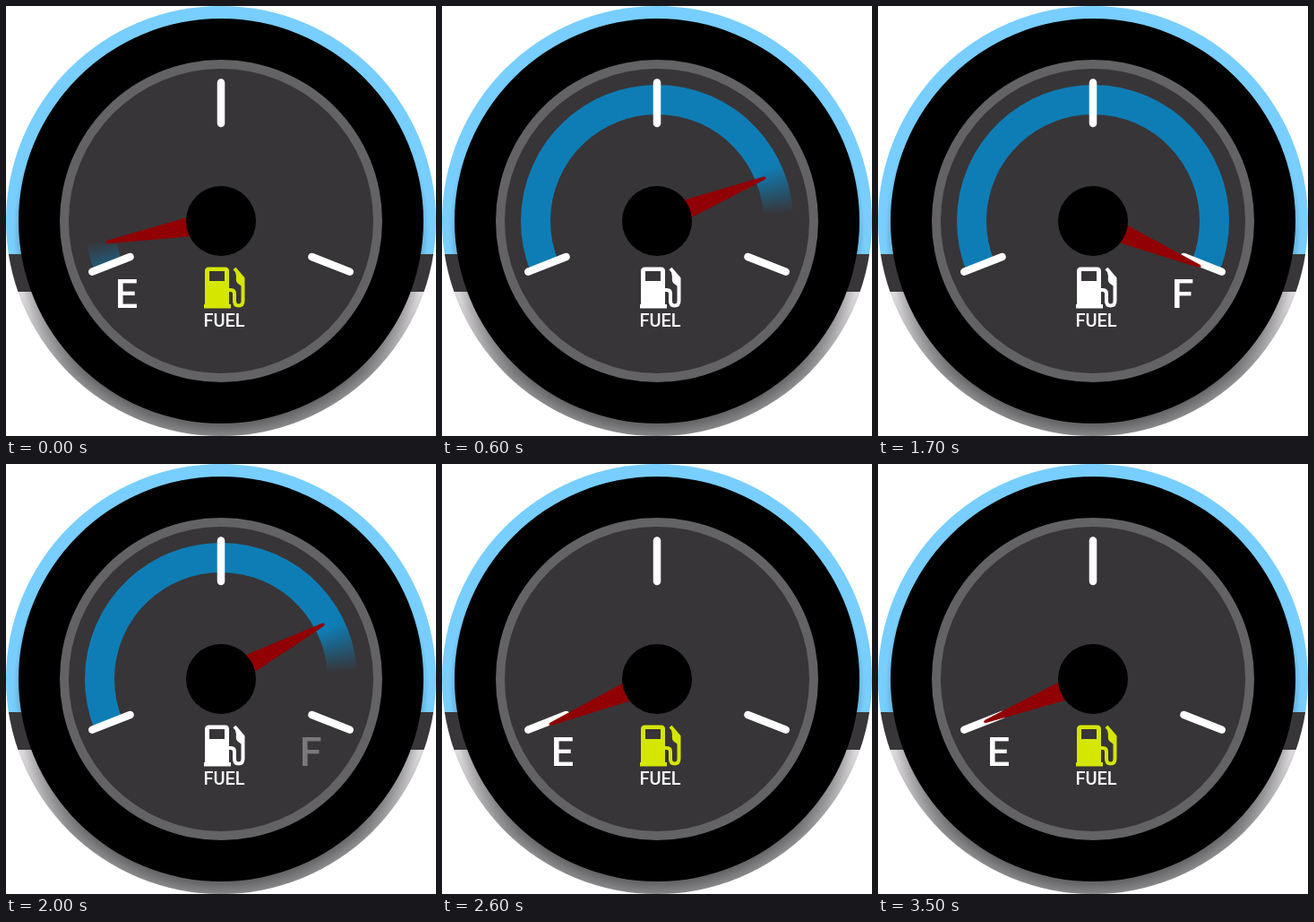
Write an HTML page with a canvas that moves like this. It is 480 px wide and 480 px high and loops after 3.6 s.

```html
<!DOCTYPE html>
<html>
<head>
<meta charset="utf-8">
<style>
html, body { margin: 0; width: 100%; height: 100%; overflow: hidden; background: #fff; }
canvas { display: block; }
</style>
</head>
<body>
<canvas id="stage" width="480" height="480"></canvas>
<script>
const ctx = document.getElementById('stage').getContext('2d');
const LOOP = 3600, C = 240, RAD = Math.PI / 180;
const FACE = '#373538', SWEEP = 113;

const ramp = (t, a, b) => Math.min(1, Math.max(0, (t - a) / (b - a)));
const ease = x => x * x * (3 - 2 * x);
const mix = (a, b, k) => a + (b - a) * k;

function disc(r, color) {
  ctx.fillStyle = color;
  ctx.beginPath();
  ctx.arc(C, C, r, 0, 7);
  ctx.fill();
}

function text(str, x, y, size, alpha = 1) {
  ctx.globalAlpha = alpha;
  ctx.fillStyle = '#fff';
  ctx.font = `500 ${size}px Roboto, sans-serif`;
  ctx.textAlign = 'center';
  ctx.fillText(str, x, y);
  ctx.globalAlpha = 1;
}

// Draw with the angle measured clockwise from twelve o'clock.
function rotated(angle, draw) {
  ctx.save();
  ctx.translate(C, C);
  ctx.rotate(angle * RAD);
  draw();
  ctx.restore();
}

function bezel() {
  ctx.save();
  ctx.beginPath();
  ctx.arc(C, C, 240, 0, 7);
  ctx.clip();
  ctx.fillStyle = '#78ceff';
  ctx.fillRect(0, 0, 480, 277);
  const metal = ctx.createLinearGradient(0, 319, 0, 410);
  metal.addColorStop(0, '#dddbdd');
  metal.addColorStop(1, '#929193');
  ctx.fillStyle = metal;
  ctx.fillRect(0, 319, 480, 161);
  const shadow = ctx.createRadialGradient(C, 252, 216, C, 252, 232);
  shadow.addColorStop(0, 'rgba(0,0,0,.3)');
  shadow.addColorStop(1, 'rgba(0,0,0,0)');
  ctx.fillStyle = shadow;
  ctx.fillRect(0, 0, 480, 480);
  ctx.fillStyle = '#383638';
  ctx.fillRect(0, 277, 480, 42);
  ctx.restore();
  disc(226, '#000');
  disc(180, '#636264');
  disc(170, FACE);
}

function band(lead) {
  const stop = a => Math.min(1, Math.max(0, (a + 180) / 360));
  const fill = ctx.createConicGradient(Math.PI / 2, C, C);
  fill.addColorStop(stop(lead - 11), 'rgba(15,125,181,1)');
  fill.addColorStop(stop(lead + 11), 'rgba(15,125,181,0)');
  ctx.strokeStyle = fill;
  ctx.lineWidth = 33;
  ctx.lineCap = 'butt';
  ctx.beginPath();
  ctx.arc(C, C, 135.5, (-111.5 - 90) * RAD, (111.5 - 90) * RAD);
  ctx.stroke();
}

function tick(angle) {
  rotated(angle, () => {
    ctx.strokeStyle = '#fff';
    ctx.lineWidth = 8.5;
    ctx.lineCap = 'round';
    ctx.beginPath();
    ctx.moveTo(0, -109);
    ctx.lineTo(0, -154.5);
    ctx.stroke();
  });
}

function needle(angle) {
  rotated(angle, () => {
    ctx.fillStyle = '#900004';
    ctx.beginPath();
    ctx.moveTo(-11, -34);
    ctx.lineTo(-1.8, -129);
    ctx.quadraticCurveTo(0, -133, 1.8, -129);
    ctx.lineTo(11, -34);
    ctx.fill();
  });
}

const body = new Path2D('M222 337V296Q222 291.500 226.500 291.500H244.500Q249 291.500 249 296V337Z');
const hose = new Path2D('M249 317H251Q255 317 255 321V329Q255 334.500 259.500 334.500Q264.500 334.500 264.500 329V304L255 293');
const nozzle = new Path2D('M256 297L265 303V314L259 310Q256 307 257 302Z');

function pump(k) {
  const color = `rgb(${mix(255, 213, k)},${mix(255, 230, k)},${mix(255, 0, k)})`;
  ctx.fillStyle = ctx.strokeStyle = color;
  ctx.fill(body);
  ctx.fillRect(221, 333, 30, 4.5);
  ctx.fill(nozzle);
  ctx.lineWidth = 4;
  ctx.lineCap = 'butt';
  ctx.lineJoin = 'round';
  ctx.stroke(hose);
  ctx.fillStyle = FACE;
  ctx.fillRect(227, 296, 17, 11);
}

// The rise starts 150 ms before the loop wraps.
function level(t, end) {
  if (t >= LOOP - 150) t -= LOOP;
  return ease(ramp(t, -150, 900)) - ease(ramp(t, 1800, end));
}

function frame(now) {
  const t = Math.floor(now % LOOP / 100) * 100;
  const empty = t < 1500 ? 1 - ramp(t, 0, 300) : ramp(t, 2100, 2500);
  const full = ramp(t, 650, 950) - ramp(t, 1800, 2100);
  const warn = t < 1500 ? 1 - ramp(t, 0, 300) : ramp(t, 2040, 2500);

  ctx.clearRect(0, 0, 480, 480);
  bezel();
  band(mix(-124, 125, level(t, 2500)));
  [-111.5, 0, 111.5].forEach(tick);
  text('E', 134.5, 337, 45, empty);
  text('F', 340, 337, 45, full);
  pump(warn);
  text('FUEL', 243.5, 358, 20);
  needle(mix(-SWEEP, SWEEP, level(t, 2450)));
  disc(39, '#000');
  requestAnimationFrame(frame);
}
requestAnimationFrame(frame);
</script>
</body>
</html>
```
